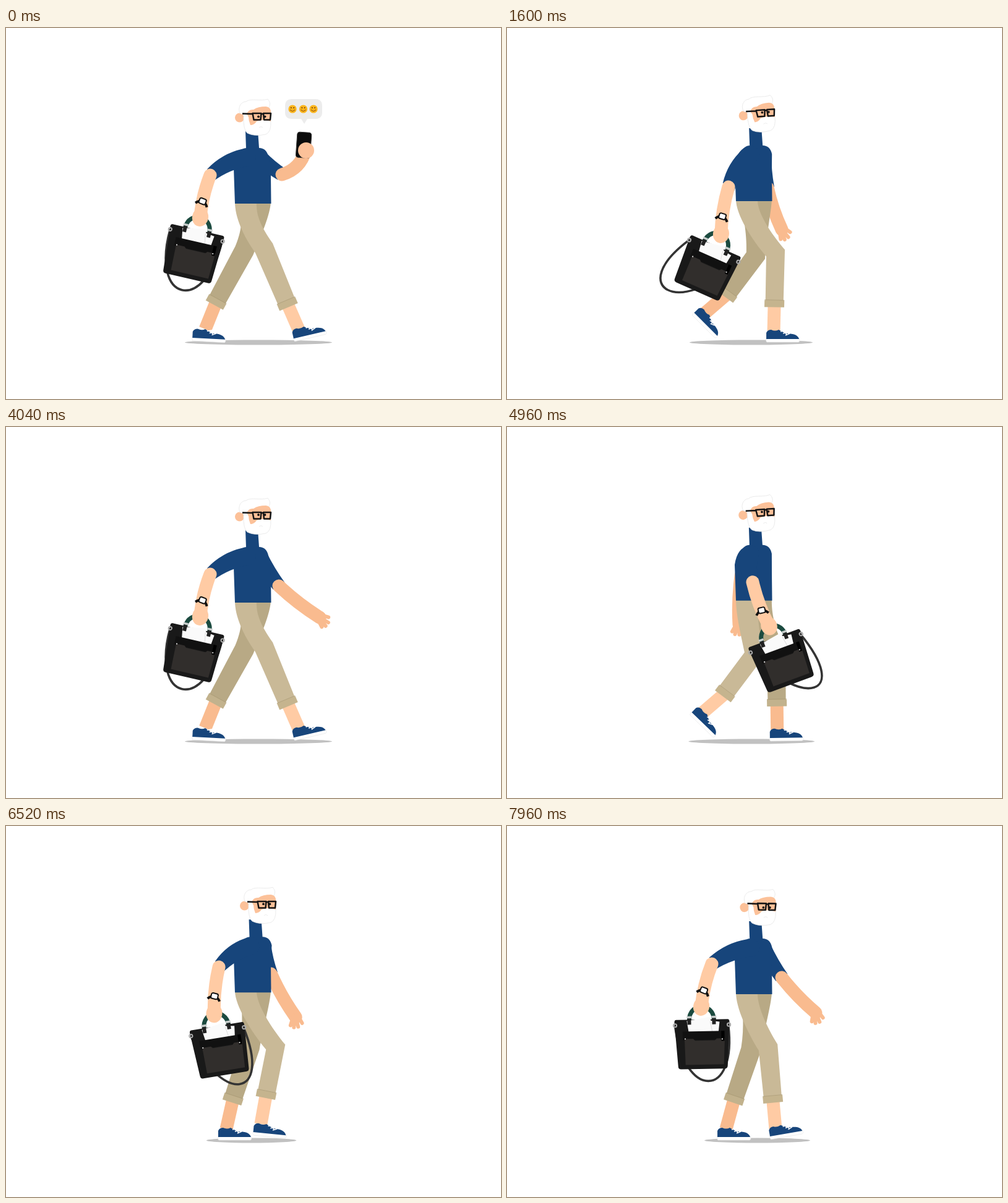
Animation of 800x600 px, one loop 8000 ms. Source, as an HTML page:

```html
<!DOCTYPE html>
<html lang="en">
<head>
<meta charset="utf-8">
<title>Walk cycle</title>
<style>
  html, body { margin: 0; width: 100%; height: 100%; overflow: hidden; background: #fff; }
  svg { display: block; width: 100vw; height: 100vh; }
</style>
</head>
<body>
<svg viewBox="0 0 800 600">
  <defs>
    <g id="shoe">
      <path d="M0-6 L53-6 Q55-1 52 0 L1 0 Q-1-1 0-6Z" fill="#fff" stroke="#e8e8e8" stroke-width=".7"/>
      <path d="M0-5 L0-15 Q2-20 8-20 Q14-17 20-20 L31-14 C43-14 51-12 53-5Z" fill="#17457b"/>
      <path d="M23-17 l8-2 M27-14 l8-2 M31-11 l7-3 M29-18 l4 6" stroke="#fff" stroke-width="1.5" fill="none"/>
    </g>
    <g id="face">
      <circle r="6.6" fill="#fbb51c"/>
      <path d="M-3.8 1 Q0 6 3.8 1" fill="none" stroke="#8a4b10" stroke-width="1.1"/>
      <circle cx="-2.2" cy="-2" r="1" fill="#6b3a10"/><circle cx="2.2" cy="-2" r="1" fill="#6b3a10"/>
    </g>
  </defs>

  <ellipse id="shadow" cy="508.5" ry="4" fill="#c1c1c1"/>

  <g id="farArm">
    <path id="farSleeve" fill="#17457b"/>
    <path id="farFore" fill="none" stroke="#f9bb8f" stroke-width="21" stroke-linecap="round"/>
    <path id="fingers" d="M-4-3 L11-9 M-2 0 L16-2 M-2 1 L16 5 M-3 3 L12 10" fill="none" stroke="#f9bb8f" stroke-width="6" stroke-linecap="round"/>
    <g id="phone">
      <rect x="-15" y="-29" width="23" height="41" rx="4" fill="#0b0b0b" stroke="#333" stroke-width="1" transform="rotate(4)"/>
      <circle cx="1" r="13" fill="#fcc199"/>
    </g>
    <g id="bubble">
      <path d="M-22-83 H16 Q27-83 27-72 V-62 Q27-51 16-51 H3 L-2-43 L-7-51 H-22 Q-33-51-33-62 V-72 Q-33-83-22-83Z" fill="#ececec"/>
      <use href="#face" x="-21" y="-67"/><use href="#face" x="-3.5" y="-67"/><use href="#face" x="13" y="-67"/>
    </g>
  </g>

  <g id="farLeg"></g>
  <g id="nearLeg"></g>

  <path id="torso" fill="#17457b"/>

  <g id="head">
    <circle cx="377.5" cy="145" r="7.5" fill="#fcc199"/>
    <path d="M378 138 C374 128 380 119 388 119 C395 113 412 119 423 115 Q429 122 425 128 L428 150 Q429 168 420 172 Q402 176 390 170 Q383 165 384 140Z" fill="#fff" stroke="#e6e6e6" stroke-width=".8"/>
    <path d="M389 139 Q392 131 400 132 Q407 127 420 127 Q427 128 428 134 L428 151 Q415 147 405 151 Q401 157 395 157 Q392 150 392 144Z" fill="#fcc199"/>
    <path d="M382 138.5 L399 139 M398.5 138 H412.5 L411.5 148.5 H400.5Z M416 138 H428 L427 148.5 H417Z M412 139 H417" fill="none" stroke="#151515" stroke-width="2.5" stroke-linejoin="round"/>
    <g id="eyes" fill="#151515"><circle cx="408" r="1.9"/><circle cx="418.5" r="1.9"/></g>
    <path d="M409 161 q3-3 6 0" fill="none" stroke="#eee" stroke-width="1"/>
  </g>

  <path id="nearSleeve" fill="#17457b"/>

  <g id="bag">
    <path id="strap" fill="none" stroke="#343434" stroke-width="3.6"/>
    <path d="M-20 22 C-20-7 20-7 20 22" fill="none" stroke="#1c4b40" stroke-width="7"/>
    <path d="M-41 21 H42 Q45 21 45 25 L41 96 Q41 101 36 101 H-34 Q-39 101-39 96 L-44 25 Q-44 21-41 21Z" fill="#191919"/>
    <path d="M-24 23 L13 17 L15 23 L29 25 L27 42 H-21Z" fill="#fafafa"/>
    <path d="M14 24 L17 41" stroke="#ddd" stroke-width="1"/>
    <path d="M-31 40 H37 V54 H-31Z" fill="#111"/>
    <path d="M-28 52 H-14 L-11 55 H21 L24 52 H37 L35 94 H-27Z" fill="#312e2c"/>
    <path d="M34 40 V56" stroke="#000" stroke-width="5"/>
    <path d="M-20 19 V29 M20 19 V29" stroke="#222" stroke-width="6"/>
    <path d="M-24 17 H-16 M16 17 H24" stroke="#c9cdcc" stroke-width="3.5"/>
    <g fill="none" stroke="#aaa" stroke-width="2"><circle cx="-43" cy="30" r="2.6"/><circle cx="44" cy="30" r="2.6"/></g>
    <g fill="#ddd"><circle cx="-27" cy="52" r="1.1"/><circle cx="33" cy="53" r="1.1"/></g>
  </g>

  <path id="nearFore" fill="none" stroke="#ffcba4" stroke-width="21" stroke-linecap="round"/>
  <ellipse id="hand" rx="13" ry="15" fill="#ffcba4"/>
  <g id="watch">
    <path d="M-10 5 Q0-8 10 5" fill="none" stroke="#111" stroke-width="4"/>
    <rect x="-5.5" y="-6" width="11" height="9" rx="2.5" fill="#fff" stroke="#111" stroke-width="2"/>
  </g>
</svg>
<script>
const $ = id => document.getElementById(id);
const set = (el, attrs) => { for (const k in attrs) el.setAttribute(k, attrs[k]); };
const lerp = (a, b, k) => a + (b - a) * k;
const ease = (a, b, t) => { const k = Math.min(1, Math.max(0, (t - a) / (b - a))); return k * k * (3 - 2 * k); };
const P = p => p[0].toFixed(2) + ' ' + p[1].toFixed(2) + ' ';
const add = (p, d, k = 1) => [p[0] + d[0] * k, p[1] + d[1] * k];
const mid = (a, b) => [(a[0] + b[0]) / 2, (a[1] + b[1]) / 2];
const unit = (a, b) => { const x = b[0] - a[0], y = b[1] - a[1], l = Math.hypot(x, y) || 1; return [x / l, y / l]; };
const perp = d => [-d[1], d[0]];
const deg = d => Math.atan2(d[1], d[0]) * 180 / Math.PI;

// Periodic smooth curve through rows of [time, ...values]
function track(rows) {
  const n = rows.length;
  const key = i => {
    const turn = Math.floor(i / n), r = rows[i - turn * n];
    return [r[0] + turn, r];
  };
  return u => {
    u -= Math.floor(u);
    let i = n - 1;
    while (rows[i][0] > u) i--;
    const [[t0, a], [t1, b], [t2, c], [t3, d]] = [key(i - 1), key(i), key(i + 1), key(i + 2)];
    const h = t2 - t1, s = (u - t1) / h, s2 = s * s, s3 = s2 * s;
    return b.slice(1).map((p, j) => {
      const q = c[j + 1];
      const m = (q - a[j + 1]) / (t2 - t0) * h, k = (d[j + 1] - p) / (t3 - t1) * h;
      return (2 * s3 - 3 * s2 + 1) * p + (s3 - 2 * s2 + s) * m + (3 * s2 - 2 * s3) * q + (s3 - s2) * k;
    });
  };
}

// per step: hem y, head shift, head tilt, shadow centre and half width
const body = track([
  [0, 284, 0, 0, 408, 119],
  [.364, 280, 6, -4, 394.5, 99.5],
  [.606, 271, 8, 0, 395, 73],
  [.68, 267.5, 7.5, 0, 400, 76],
  [.758, 272, 6, 1, 404.5, 85.5]
]);
// knee, cuff, ankle, heel, shoe angle
const leg = track([
  [0, 417, 356, 456, 449, 474, 490, 466, 507, -13],
  [.182, 434, 364, 432, 449, 431, 490, 419, 508, 0],
  [.303, 396, 358, 369, 445, 360, 490, 347, 508, 0],
  [.379, 394, 362, 366, 445, 354, 490, 340, 508, 0],
  [.5, 385, 360, 338, 446, 322, 487, 301, 506, 3],
  [.682, 402, 368, 354, 433, 320, 461, 299, 464, 45],
  [.803, 436, 358, 415, 436, 404, 480, 390, 497, 10],
  [.879, 422, 358, 430, 445, 434, 489, 426, 507, -10]
]);
// elbow, hand (y from the hem), bag angle, strap sway
const nearArm = track([
  [0, 330, -46, 314, 22, 13, -2],
  [.182, 358, -23, 346, 53, 24, -50],
  [.303, 371, -28, 390, 33, 6, -22],
  [.5, 432, -30, 487, 18, -13, 6],
  [.606, 418, -30, 458, 32, -20, 35],
  [.75, 365, -32, 372, 48, -17, 42],
  [.879, 331, -49, 314, 20, -1, 12]
]);
// elbow, wrist (y from the hem), extra hand bend
const farArm = track([
  [0, 441, -27, 507, 24, 0],
  [.182, 421, -22, 444, 46, -15],
  [.303, 402, -28, 400, 36, 0],
  [.5, 352, -45, 330, 22, 0],
  [.606, 362, -45, 345, 30, 0],
  [.75, 405, -35, 425, 48, 10],
  [.879, 444, -27, 499, 30, 28]
]);

function buildLeg(id, cloth, cuff, skin) {
  $(id).innerHTML =
    `<path fill="none" stroke="${skin}" stroke-width="21"/><use href="#shoe"/>` +
    `<path fill="${cloth}"/><path fill="none" stroke="${cuff}" stroke-width="11"/>` +
    `<path fill="none" stroke="#a89873" stroke-width=".7"/>`;
}
buildLeg('farLeg', '#b8a985', '#c2b28d', '#f9bb8f');
buildLeg('nearLeg', '#c9b997', '#c5b48e', '#ffcba4');

function drawLeg(id, v, hem, left, right) {
  const [kx, ky, cx, cy, ax, ay, hx, hy, rot] = leg(v);
  const [shin, shoe, cloth, cuff, seam] = $(id).children;
  const knee = [kx, ky], end = [cx, cy], ankle = [ax, ay];
  const d1 = unit([(left + right) / 2, hem + 30], knee), d2 = unit(knee, end);
  const nk = perp(unit([0, 0], add(d1, d2))), nc = perp(d2);
  const kl = add(knee, nk, 16), kr = add(knee, nk, -16);
  const el = add(end, nc, 14.5), er = add(end, nc, -14.5);
  set(shin, { d: 'M' + P(add(end, d2, -4)) + 'L' + P(ankle) });
  set(shoe, { transform: `translate(${hx} ${hy}) rotate(${rot})` });
  set(cloth, { d: 'M' + P([left, hem - 3]) +
    'C' + P([left, hem + 22]) + P(add(kl, d1, -35)) + P(kl) + 'L' + P(el) + 'L' + P(er) + 'L' + P(kr) +
    'C' + P(add(kr, d1, -35)) + P([right - 1, hem + 18]) + P([right, hem - 3]) + 'Z' });
  const c = add(end, d2, -3), top = add(end, d2, -9);
  set(cuff, { d: 'M' + P(add(c, nc, 16)) + 'L' + P(add(c, nc, -16)) });
  set(seam, { d: 'M' + P(add(top, nc, 16)) + 'L' + P(add(top, nc, -16)) });
}

function sleeve(id, s, e, w, bulge) {
  const n = perp(unit(s, e));
  const a = add(s, n, w), b = add(e, n, 11), c = add(e, n, -11), d = add(s, n, -w);
  set($(id), { d: 'M' + P(a) + 'Q' + P(add(mid(a, b), n, bulge)) + P(b) + 'L' + P(c) +
    'Q' + P(add(mid(c, d), n, bulge * .8)) + P(d) + `A${w} ${w} 0 0 0 ` + P(a) + 'Z' });
}

function forearm(id, e, h, bulge) {
  set($(id), { d: 'M' + P(e) + 'Q' + P(add(mid(e, h), perp(unit(e, h)), bulge)) + P(h) });
}

function draw(t) {
  // the last step of each cycle repeats its first pose
  const u = (t % 1360) / 1320 % 1;
  const [hem, dx, tilt, sx, sr] = body(u * 2);
  const lean = dx * .7;
  const call = 1 - ease(480, 760, t);

  set($('shadow'), { cx: sx, rx: sr });
  drawLeg('farLeg', u + .5, hem, 380, 428);
  drawLeg('nearLeg', u, hem, 370, 405);

  const f = farArm(u);
  const lift = 8 * Math.sin(Math.PI * Math.min(1, t / 660)) ** 2;
  const fe = [lerp(f[0], 446, call), hem + lerp(f[1], -47, call)];
  const fh = [lerp(f[2], 484, call), hem + lerp(f[3], -86 - lift, call)];
  sleeve('farSleeve', [411 + lean, hem - 75], fe, 12, 3);
  forearm('farFore', fe, fh, lerp(4, 15, call));
  set($('fingers'), {
    transform: `translate(${P(fh)}) rotate(${deg(unit(fe, fh)) + f[4]})`,
    opacity: call > .5 ? 0 : 1
  });
  set($('phone'), { transform: `translate(${P(fh)})`, opacity: call > .5 ? 1 : 0 });
  const pop = 1 - ease(430, 560, t);
  set($('bubble'), { transform: `translate(${P(fh)}) translate(-2 -43) scale(${pop}) translate(2 43)` });

  const x = v => (v + lean).toFixed(2), y = v => (hem + v).toFixed(2);
  set($('torso'), { d:
    `M370 ${y(0)} L368 ${y(-58)} Q${x(368)} ${y(-86)} ${x(388)} ${y(-89)} L${x(387)} ${y(-118)} H${x(407)}` +
    ` L${x(409)} ${y(-90)} Q${x(421)} ${y(-90)} ${x(424)} ${y(-76)} Q428 ${y(-62)} 428 ${y(-45)} L428.5 ${y(0)}Z` });
  set($('head'), { transform: `translate(${dx} ${hem - 284 - dx * .15}) rotate(${tilt} 400 165)` });
  const look = Math.max(call * .5, ease(6500, 6700, t));
  set($('eyes'), { transform: `translate(0 ${142 + 2.6 * look})` });

  const [ex, ey, hx, hy, rot, sway] = nearArm(u);
  const e = [ex, hem + ey], h = [hx, hem + hy];
  sleeve('nearSleeve', [389 + lean, hem - 75], e, 15, 10);
  forearm('nearFore', e, h, 5);
  const dir = unit(e, h), turn = deg(dir) - 90;
  set($('hand'), { transform: `translate(${P(h)}) rotate(${turn})` });
  const w = add([lerp(ex, hx, .65), lerp(e[1], h[1], .65)], perp(dir), 2.5);
  set($('watch'), { transform: `translate(${P(w)}) rotate(${turn + 8})` });
  set($('bag'), { transform: `translate(${P(h)}) rotate(${rot})` });
  set($('strap'), { d: `M-43 30 C${-46 + sway * 1.2} ${152 - Math.abs(sway) * .2} ${44 + sway} 152 43 30` });
}

const start = performance.now();
function tick(now) {
  const t = Math.max(0, now - start) % 8000;
  draw(Math.floor(t / 40) * 40);
  requestAnimationFrame(tick);
}
draw(0);
requestAnimationFrame(tick);
</script>
</body>
</html>
```
